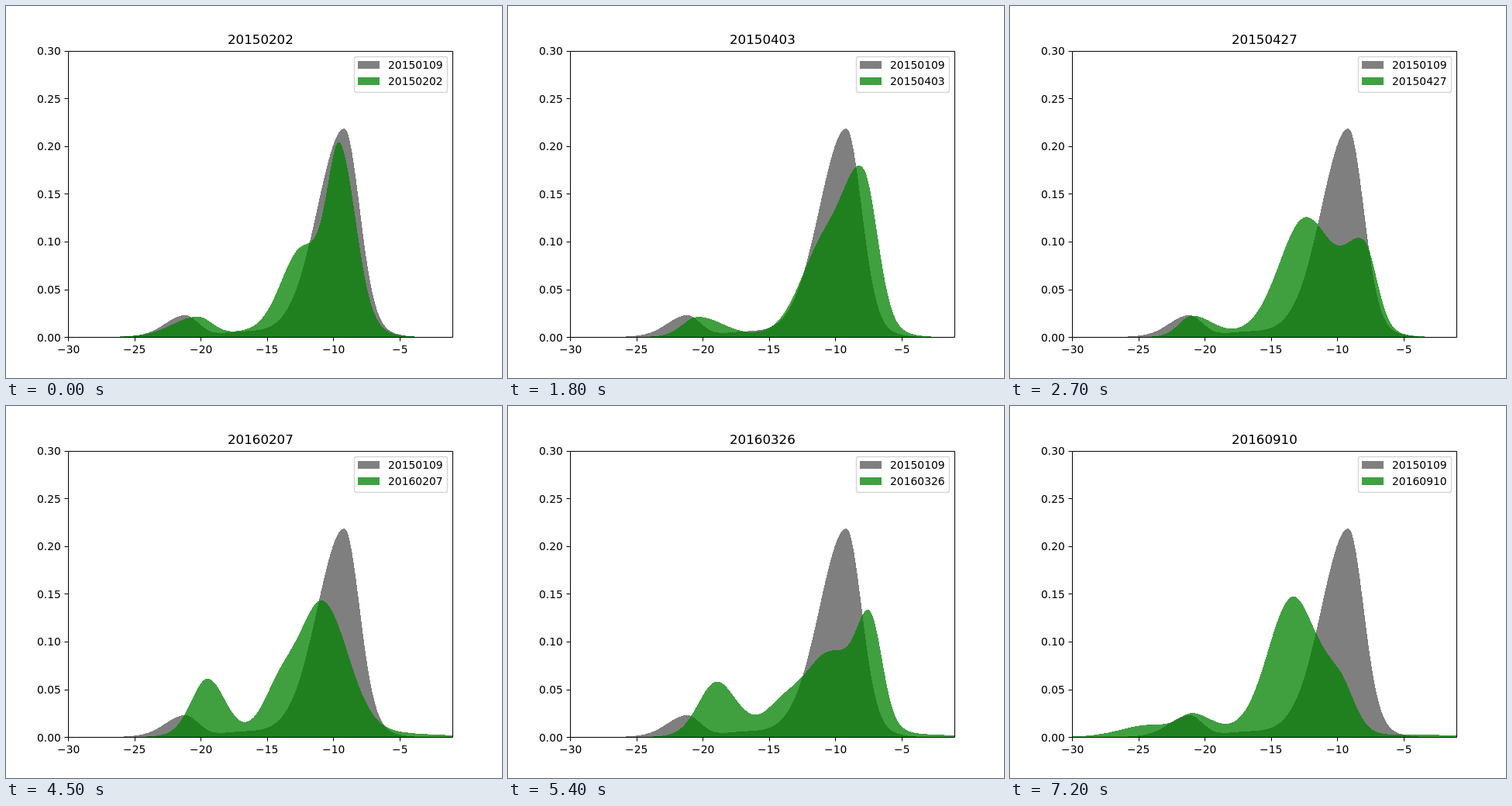
Recreate the animation shown at these times as an HTML page with a canvas. Size 640 px wide and 480 px high, loop 8100 ms.

```html
<!DOCTYPE html>
<html lang="en">
<head>
<meta charset="utf-8">
<title>Density by date</title>
<style>
  html, body { margin: 0; width: 100%; height: 100%; overflow: hidden; background: #fff; }
  canvas, svg { position: absolute; left: 0; top: 0; width: 640px; height: 480px; }
  text { font: 13.89px "DejaVu Sans", sans-serif; fill: #000; }
  #title { font-size: 16.67px; }
</style>
</head>
<body>
<canvas id="plot" width="640" height="480"></canvas>
<svg id="axes" viewBox="0 0 640 480">
  <text id="title" x="286" y="49"></text>
  <rect x="449.5" y="65.5" width="120" height="46" rx="2.8" fill="#fff" stroke="#d6d6d6" stroke-width="1.39"/>
  <rect x="454" y="71" width="28" height="10" fill="#808080"/>
  <rect x="454" y="92" width="28" height="10" fill="#40a040"/>
  <text x="493" y="81">20150109</text>
  <text id="label" x="493" y="102"></text>
</svg>
<script>
const STEP = 900;
const BASE = 427.2, LEFT = 80, RIGHT = 576;
const ctx = document.getElementById('plot').getContext('2d');
const svg = document.getElementById('axes');
const title = document.getElementById('title');
const label = document.getElementById('label');

// Lopsided bell with slightly heavy tails; centre, height and spreads in pixels.
const bell = (center, height, left, right) => x => {
  const t = (x - center) / (x < center ? left : right);
  return height * (.9 * Math.exp(-t * t / 2) + .1 * Math.exp(-t * t / 6));
};
const sum = (...parts) => x => parts.reduce((total, part) => total + part(x), 0);
const mix = (a, b) => x => (a(x) + b(x)) / 2;

const tail = bell(520, 3, 30, 70);

const reference = sum(
  bell(231, 28, 25, 17), bell(300, 5, 24, 28), bell(436.5, 269, 34, 19.4));

const feb = sum(
  bell(247, 26, 32, 19), bell(305, 3.5, 22, 22),
  bell(382, 112, 27, 30), bell(431.5, 217, 15.7, 20));

const april = sum(
  bell(245, 26, 19.5, 32), bell(408, 113, 30, 30), bell(459, 186, 24, 18));

const lateApril = sum(
  bell(235, 27, 16.5, 26), bell(381, 152, 33, 34), bell(457, 107, 24, 16));

const winter = sum(
  bell(260, 75, 20.5, 22), bell(356, 64, 22, 25), bell(410, 167, 27, 31.5), tail);

const spring = sum(
  bell(278, 78, 21, 25), bell(365, 17, 40, 25),
  bell(430, 50, 22, 20), bell(467.5, 274, 17, 15.5), tail);

const autumn = sum(
  bell(180, 15.5, 36, 55), bell(237, 20.5, 16.5, 24),
  bell(363.5, 174, 30.5, 28), bell(424, 65, 26, 19), tail);

const scenes = [
  ['20150202', feb],
  ['20150310', mix(feb, april)],
  ['20150403', april],
  ['20150427', lateApril],
  ['20150918', mix(lateApril, winter)],
  ['20160207', winter],
  ['20160326', mix(winter, spring)],
  ['20160419', spring],
  ['20160910', autumn]
];

function add(name, attrs, text = '') {
  const el = document.createElementNS(svg.namespaceURI, name);
  for (const key in attrs) el.setAttribute(key, attrs[key]);
  el.textContent = text;
  svg.append(el);
}

function addAxes() {
  const snap = v => Math.floor(v + .5) + .5;
  let lines = 'M80.5 58.5H576.5V427.5H80.5Z';
  for (let i = 0; i < 6; i++) {
    const x = LEFT + i * 5 * (RIGHT - LEFT) / 29;
    const name = '\u2212' + (30 - i * 5);
    lines += `M${snap(x)} 427.5v5`;
    add('text', { x: Math.round(x - 1 - 4.4 * name.length), y: 448 }, name);
  }
  for (let i = 0; i < 7; i++) {
    const y = BASE - i * 61.6;
    lines += `M80.5 ${snap(y)}h-5`;
    add('text', { x: 40, y: Math.round(y + 5.4) }, (i * .05).toFixed(2));
  }
  add('path', { d: lines, fill: 'none', stroke: '#000' });
}

// Whole-pixel columns give the hard, unsmoothed outline.
function fill(density, color) {
  ctx.fillStyle = color;
  for (let x = LEFT; x < RIGHT; x++) {
    const top = Math.round(BASE - density(x + .5));
    if (top < 427) ctx.fillRect(x, top, 1, 427 - top);
  }
}

let shown = -1;
function draw() {
  const index = Math.floor(performance.now() / STEP) % scenes.length;
  if (index !== shown) {
    shown = index;
    const [date, density] = scenes[index];
    title.textContent = label.textContent = date;
    ctx.clearRect(0, 0, 640, 480);
    fill(reference, 'rgba(0,0,0,.5)');
    fill(density, 'rgba(0,128,0,.75)');
  }
  requestAnimationFrame(draw);
}

addAxes();
draw();
</script>
</body>
</html>
```
